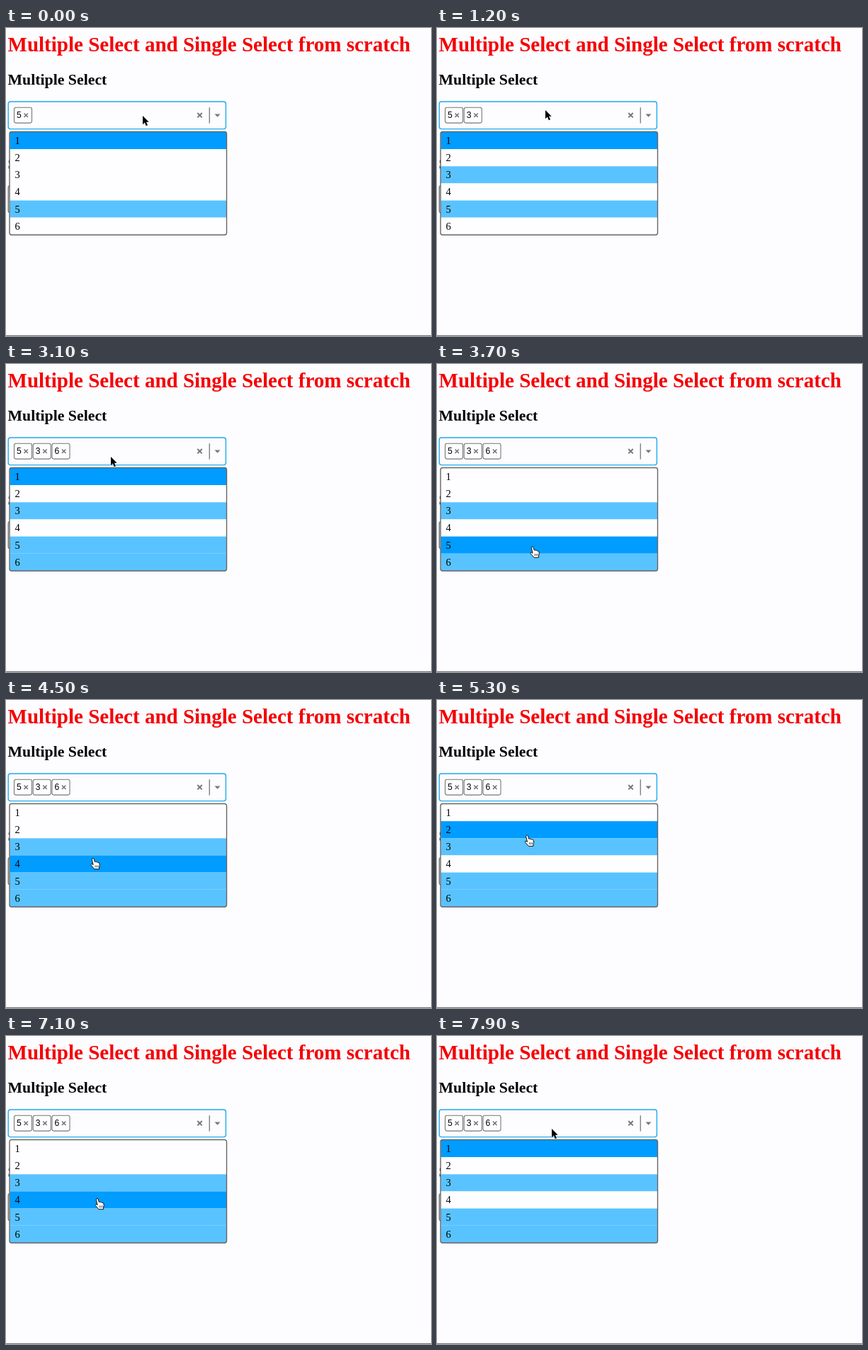
Animation of 600 by 435 pixels, one loop 8000 ms. Source, as an HTML page:

```html
<!DOCTYPE html>
<html lang="en">
<head>
<meta charset="utf-8">
<title>Select from scratch</title>
<style>
  html, body { margin: 0; width: 100%; height: 100%; overflow: hidden; background: #fdfcff; }
  svg { display: block; width: 600px; height: 435px; }
  text { font-family: "Liberation Serif", "Times New Roman", serif; font-size: 14.5px; }
  .title { font-size: 29.02px; font-weight: bold; fill: #f50004; }
  .heading { font-size: 21.8px; font-weight: bold; }
  .tag text { font-family: "Liberation Sans", Arial, sans-serif; font-size: 12.1px; }
  .box { fill: none; stroke-width: 1.4; }
</style>
</head>
<body>
<svg id="stage" viewBox="0 0 600 435">
  <rect width="600" height="435" fill="#fdfcff"/>
  <text class="title" x="2.5" y="33">Multiple Select and Single Select from scratch</text>
  <text class="heading" x="2.5" y="80">Multiple Select</text>
  <text class="heading" x="2.5" y="199">Single Select</text>
  <rect y="434" width="600" height="1" fill="#707070"/>
</svg>
<script>
const LOOP = 8000, STEP = 100;
const ROW_TOP = 147, ROW_HEIGHT = 24.15, ROWS = 6;
const GRAY = '#777';
const stage = document.getElementById('stage');

function add(parent, name, attrs, text) {
  const node = document.createElementNS('http://www.w3.org/2000/svg', name);
  for (const key in attrs) node.setAttribute(key, attrs[key]);
  if (text) node.textContent = text;
  parent.append(node);
  return node;
}

const show = (node, on) => node.setAttribute('visibility', on ? 'visible' : 'hidden');

function cross(parent, x, y, r, width) {
  add(parent, 'path', {
    d: `M${x - r} ${y - r}L${x + r} ${y + r}M${x + r} ${y - r}L${x - r} ${y + r}`,
    stroke: GRAY, 'stroke-width': width
  });
}

function selectBox(top, color) {
  const g = add(stage, 'g', {});
  add(g, 'rect', { class: 'box', x: 3.2, y: top, width: 307.2, height: 38.6, rx: 3, stroke: color });
  cross(g, 273.5, top + 19.2, 3.2, 1.9);
  add(g, 'rect', { x: 286.6, y: top + 8.2, width: 1.3, height: 22.4, fill: GRAY });
  add(g, 'path', { d: `M294.5 ${top + 17.5}h8l-4 4.2z`, fill: GRAY });
  return g;
}

const multiple = selectBox(104, '#1fabeb');
const single = selectBox(222.5, GRAY);
add(single, 'text', { x: 12, y: 246.5 }, '1');

// Chosen values in click order, with the moment of each click
const picks = [{ value: 5, at: 0 }, { value: 3, at: 700 }, { value: 6, at: 2300 }];
const reopenings = [1100, 3000];

picks.forEach((pick, i) => {
  const x = 11.5 + i * 26.75;
  pick.node = add(multiple, 'g', { class: 'tag' });
  add(pick.node, 'rect', { x, y: 112.3, width: 25, height: 21.8, rx: 2.5, fill: 'none', stroke: GRAY, 'stroke-width': 1.1 });
  add(pick.node, 'text', { x: x + 3.6, y: 127.3 }, String(pick.value));
  cross(pick.node, x + 16.7, 123.2, 2.7, 1.5);
});

const panel = add(stage, 'g', {});
add(panel, 'rect', { x: 5, y: 146.5, width: 306.5, height: 145.8, rx: 3, fill: '#fefdff' });
const rows = Array.from({ length: ROWS }, (_, i) => {
  const y = ROW_TOP + i * ROW_HEIGHT;
  const back = add(panel, 'rect', { x: 5.4, y, width: 305.8, height: ROW_HEIGHT });
  add(panel, 'text', { x: 12.5, y: y + 17 }, String(i + 1));
  return back;
});
add(panel, 'rect', { class: 'box', x: 5, y: 146.5, width: 306.5, height: 145.8, rx: 3, stroke: '#666' });

const arrow = add(stage, 'path', {
  d: 'M0 0V12.2L2.8 9.6L4.8 14.2L7 13.2L5 8.8H8.7Z',
  fill: '#000', stroke: '#fff', 'stroke-width': 1, 'paint-order': 'stroke'
});
const hand = add(stage, 'g', {});
add(hand, 'path', {
  d: 'M-1.8 1Q-1.6-.6 0-.5Q1-.3 1.3 1L2.3 4.6Q3.5 3.8 4.5 4.9Q5.8 4.2 6.7 5.5Q8.5 5 9 7Q9.7 10 8.6 12V14.8H2L-2.5 9.7Q-3.7 8.2-2.6 7.6Q-1.4 7.3.1 8.8Z',
  fill: '#fff', stroke: '#111', 'stroke-width': 1, 'stroke-linejoin': 'round'
});
add(hand, 'path', { d: 'M3 9.5v3M5 9.5v3M7 9.5v3', stroke: '#111', 'stroke-width': .7 });

// Pointer tip: time, x, y
const path = [
  [0, 193, 124], [200, 188, 145], [500, 162, 203], [700, 158, 208],
  [1000, 153, 122], [1200, 153, 116], [1400, 152, 160], [1800, 145, 280],
  [2300, 143, 283], [2700, 146, 190], [3000, 148, 131], [3200, 148, 131],
  [3500, 140, 240], [3900, 130, 277], [4200, 126, 235], [4500, 123, 224],
  [4900, 125, 238], [5400, 128, 180], [5700, 130, 162], [6000, 131, 184],
  [6300, 130, 235], [6700, 129, 286], [7100, 129, 230], [7500, 141, 172],
  [7800, 160, 133], [7900, 162, 131]
];

function pointerAt(t) {
  const next = path.findIndex(p => p[0] > t);
  if (next < 0) return path.at(-1).slice(1);
  const a = path[next - 1], b = path[next];
  const k = (t - a[0]) / (b[0] - a[0]);
  return [a[1] + (b[1] - a[1]) * k, a[2] + (b[2] - a[2]) * k];
}

const isOpen = t => !picks.some((pick, i) => i > 0 && t >= pick.at && t < reopenings[i - 1]);

// The last row touched stays highlighted until the panel opens again
function highlightedAt(t) {
  let row = 0;
  for (let s = 0; s <= t; s += STEP) {
    if (reopenings.includes(s)) row = 0;
    const y = pointerAt(s)[1];
    if (isOpen(s) && y >= ROW_TOP) row = Math.min(ROWS - 1, Math.floor((y - ROW_TOP) / ROW_HEIGHT));
  }
  return row;
}

function draw(t) {
  const [x, y] = pointerAt(t);
  const open = isOpen(t), highlighted = highlightedAt(t);
  const chosen = picks.filter(pick => t >= pick.at).map(pick => pick.value);
  picks.forEach(pick => show(pick.node, t >= pick.at));
  show(panel, open);
  rows.forEach((row, i) => row.setAttribute('fill',
    i === highlighted ? '#009cff' : chosen.includes(i + 1) ? '#59c3ff' : '#fefdff'));
  const pointing = open && y >= ROW_TOP;
  show(hand, pointing);
  show(arrow, !pointing);
  (pointing ? hand : arrow).setAttribute('transform', `translate(${x} ${y})`);
}

const start = performance.now();
function tick() {
  const t = (performance.now() - start) % LOOP;
  draw(Math.floor(t / STEP) * STEP);
  requestAnimationFrame(tick);
}
tick();
</script>
</body>
</html>
```
